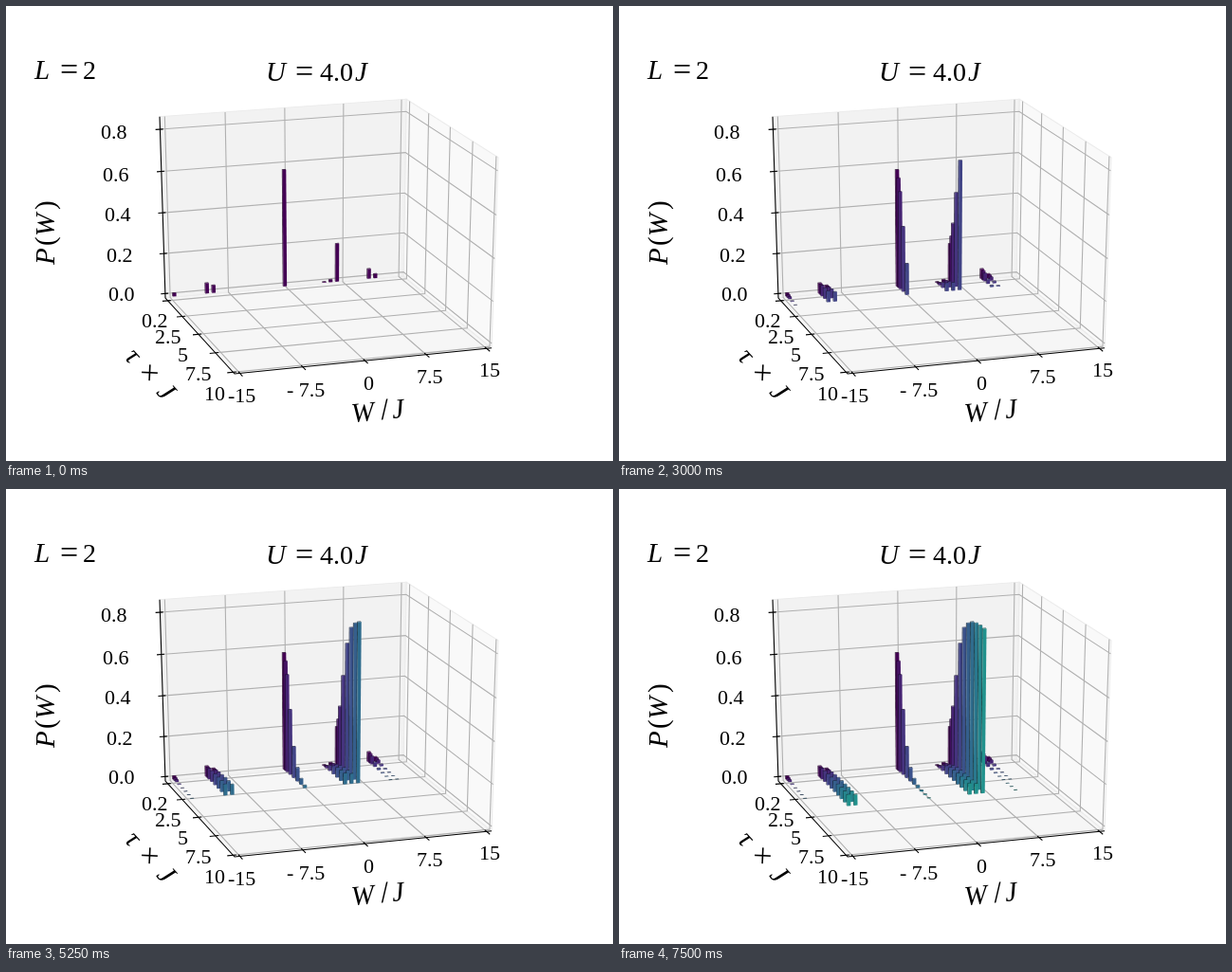
An HTML page with a canvas that plays this animation: 640 by 480 pixels, repeating every 8 s.

```html
<!DOCTYPE html>
<html lang="en">
<head>
<meta charset="utf-8">
<title>P(W) over time</title>
<style>
  html, body { margin: 0; width: 100%; height: 100%; overflow: hidden; background: #fff; }
  canvas { display: block; }
</style>
</head>
<body>
<canvas id="stage" width="640" height="480"></canvas>
<script>
const ctx = document.getElementById('stage').getContext('2d');
const LOOP = 8000, STEP = 750;

// Perspective box: u runs along W, v along tau, z upwards, each 0..1
function project(u, v, z) {
  const w = 1 + 0.027 * u - 0.083 * v - 0.0353 * z;
  return [
    (168 + 262.3 * u + 53 * v - 11.7 * z) / w,
    (308 - 15.2 * u + 47.8 * v - 195.3 * z) / w
  ];
}
const uOf = W => 0.02 + 0.96 * (W + 15) / 30;
const vOf = tau => 0.02 + 0.096 * tau;
const zOf = p => 0.025 + 1.135 * p;

const W_TICKS = [-15, -7.5, 0, 7.5, 15];
const TAU_TICKS = [0.2, 2.5, 5, 7.5, 10];
const P_TICKS = [0, 0.2, 0.4, 0.6, 0.8];

// One row of bars per tau; the weight moves from the middle peak to the right one
const TAUS = [0.2, 0.4, 0.6, 1, 1.5, 2, 2.5, 3, 3.5, 4, 4.5];
const DECAY = [1, 0.94, 0.835, 0.56, 0.27, 0.117, 0.052, 0.023, 0.01, 0.005, 0.002];
const PEAK = [0.192, 0.235, 0.305, 0.468, 0.638, 0.727, 0.762, 0.78, 0.788, 0.79, 0.789];
const BAR_W = 0.45, BAR_TAU = 0.1;

const VIRIDIS = [[68, 1, 84], [71, 45, 123], [59, 82, 139], [44, 114, 142], [33, 145, 140]];
const mix = (a, b, f) => a + (b - a) * f;

function rowColor(k) {
  const s = k / 10 * 4, i = Math.min(3, Math.floor(s));
  return VIRIDIS[i].map((c, j) => mix(c, VIRIDIS[i + 1][j], s - i));
}

const shade = (rgb, f) => 'rgb(' + rgb.map(c => Math.round(c * f)).join(',') + ')';

function rowBars(k) {
  const m = DECAY[k], fade = Math.pow(m, 1.3);
  const bars = [
    [-10.87, mix(0.055, 0.052, m)],
    [-10.02, mix(0.052, 0.038, m)],
    [-0.79, 0.577 * m],
    [4.38, mix(0.055, 0.004, m)],
    [5.21, mix(0.05, 0.013, m)],
    [6.06, PEAK[k]],
    [10.29, 0.05 * fade]
  ];
  if (k < 8) bars.push([-15.05, 0.017 * m * m * m], [11.14, 0.022 * fade]);
  return bars;
}

function face(points, fill) {
  ctx.beginPath();
  points.forEach(p => ctx.lineTo(...project(...p)));
  ctx.closePath();
  ctx.fillStyle = fill;
  ctx.fill();
}

function line(color, ...points) {
  ctx.beginPath();
  points.forEach(p => ctx.lineTo(...project(...p)));
  ctx.strokeStyle = color;
  ctx.lineWidth = 1.1;
  ctx.stroke();
}

function bar(W, tau, p, rgb) {
  const u0 = uOf(W), u1 = uOf(W + BAR_W);
  const v0 = vOf(tau), v1 = vOf(tau + BAR_TAU);
  const z0 = zOf(0), z1 = zOf(p);
  face([[u0, v0, z1], [u1, v0, z1], [u1, v1, z1], [u0, v1, z1]], shade(rgb, 0.5));
  face([[u0, v0, z0], [u0, v1, z0], [u0, v1, z1], [u0, v0, z1]], shade(rgb, 0.45));
  face([[u0, v1, z0], [u1, v1, z0], [u1, v1, z1], [u0, v1, z1]], shade(rgb, 1));
}

function text(str, x, y, size, italic) {
  ctx.font = (italic ? 'italic ' : '') + size + 'px "Liberation Serif", serif';
  ctx.fillStyle = '#000';
  ctx.fillText(str, x, y);
}

function turned(x, y, degrees, draw) {
  ctx.save();
  ctx.translate(x, y);
  ctx.rotate(degrees * Math.PI / 180);
  draw();
  ctx.restore();
}

function drawBox() {
  const grid = '#b0b0b0', edge = '#ececec', axis = '#000';
  const back = [[0, 0, 0], [1, 0, 0], [1, 0, 1], [0, 0, 1]];
  const side = [[1, 0, 0], [1, 1, 0], [1, 1, 1], [1, 0, 1]];
  const floor = [[0, 0, 0], [1, 0, 0], [1, 1, 0], [0, 1, 0]];
  face(back, '#f2f2f2');
  face(side, '#f9f9f9');
  face(floor, '#f6f6f6');
  [back, side, floor].forEach(pane => line(edge, ...pane, pane[0]));

  W_TICKS.map(uOf).forEach(u => line(grid, [u, 1, 0], [u, 0, 0], [u, 0, 1]));
  TAU_TICKS.map(vOf).forEach(v => line(grid, [0, v, 0], [1, v, 0], [1, v, 1]));
  P_TICKS.map(zOf).forEach(z => line(grid, [0, 0, z], [1, 0, z], [1, 1, z]));

  line(axis, [0, 0, 1], [0, 0, 0], [0, 1, 0], [1, 1, 0]);
  W_TICKS.map(uOf).forEach(u => line(axis, [u, 0.98, 0], [u, 1.035, 0]));
  TAU_TICKS.map(vOf).forEach(v => line(axis, [-0.022, v, 0], [0.012, v, 0]));
  P_TICKS.map(zOf).forEach(z => line(axis, [-0.018, 0, z], [0.012, 0, z]));
}

function drawLabels() {
  text('L', 30, 77, 29, true);
  text('=', 57, 78, 34);
  text('2', 81, 77, 28);
  text('U', 274, 79, 29, true);
  text('=', 305, 80, 34);
  text('4.0', 331, 79, 28);
  text('J', 368, 79, 29, true);

  [['0.8', 100, 140], ['0.6', 102, 185], ['0.4', 104, 227], ['0.2', 106, 270], ['0.0', 108, 311],
   ['0.2', 143, 339], ['2.5', 157, 356], ['5', 181, 375], ['7.5', 189, 395], ['10', 209, 416],
   ['-15', 234, 418], ['- 7.5', 296, 412], ['0', 377, 405], ['7.5', 433, 398], ['15', 499, 391]
  ].forEach(([str, x, y]) => text(str, x, y, 22));

  turned(51, 273, -90, () => {
    text('P', 0, 0, 29, true);
    text('(', 20, 0, 29);
    text('W', 30, 0, 29, true);
    text(')', 58, 0, 29);
  });
  turned(368, 439, -5.7, () => {
    text('W', -3, 0, 29, true);
    text('/', 28, 0, 32);
    text('J', 40, 0, 29, true);
  });
  turned(124, 371, 47.6, () => {
    text('τ', 0, 0, 29, true);
    text('×', 21, 1, 32);
    text('J', 50, 0, 29, true);
  });
}

function frame() {
  const last = Math.min(TAUS.length - 1, Math.floor(performance.now() % LOOP / STEP));
  ctx.fillStyle = '#fff';
  ctx.fillRect(0, 0, 640, 480);
  drawBox();
  for (let k = 0; k <= last; k++) {
    const rgb = rowColor(k);
    rowBars(k).forEach(([W, p]) => bar(W, TAUS[k], p, rgb));
  }
  drawLabels();
  requestAnimationFrame(frame);
}
frame();
</script>
</body>
</html>
```
